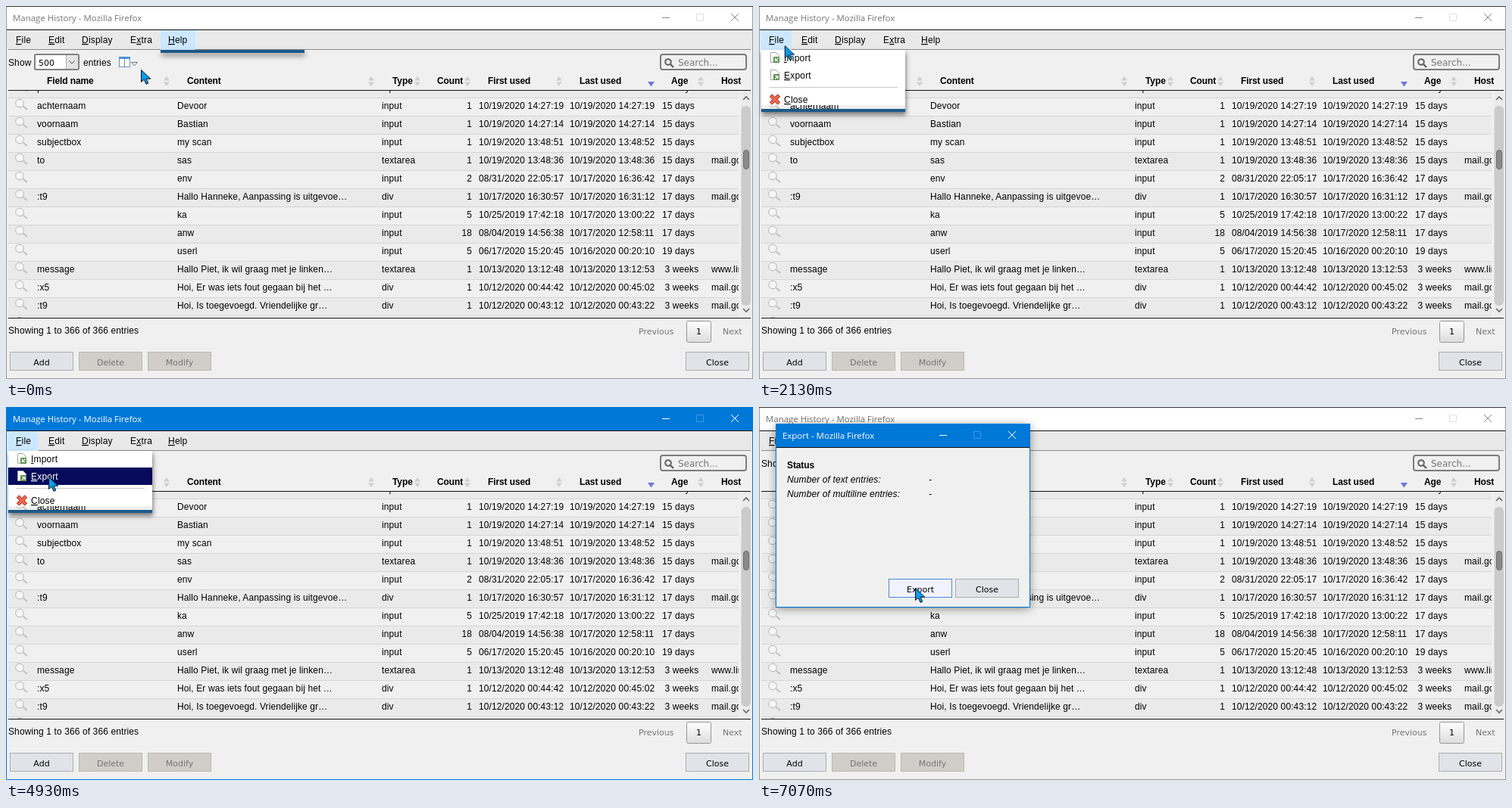
Write an HTML page that moves like this. It is 986x493 px and loops after 8 s.

```html
<!DOCTYPE html>
<html lang="en">
<head>
<meta charset="utf-8">
<title>Manage History</title>
<style>
html, body { margin: 0; width: 986px; height: 493px; overflow: hidden; background: #f0f0f0; }
svg { position: absolute; left: 0; top: 0; }
text { font: 12px "Liberation Sans", Arial, sans-serif; letter-spacing: .11px; fill: #000; white-space: pre; }
.bold { font-weight: bold; letter-spacing: -.1px; }
.ital { font-style: italic; }
.menu { letter-spacing: .2px; }
.title { font: 11.45px "Open Sans", "Noto Sans", sans-serif; letter-spacing: 0; }
.ui { font: 11px "DejaVu Sans", sans-serif; letter-spacing: 0; }
.mid { text-anchor: middle; }
.end { text-anchor: end; }
.dim { fill: #757575; }
.white { fill: #fff; }
.u { text-decoration: underline; }

.drop { position: absolute; top: 58px; width: 190px; height: 0; overflow: hidden;
  border-bottom: 4px solid #1d5a88; box-shadow: 1px 4px 6px rgba(0, 0, 0, .5); }
#file { left: 3px; animation: fileOn 8s step-end infinite, unroll 8s infinite; }
#file svg { left: -3px; top: -58px; }
#help { left: 204px; }
#help, .helpOn { animation: helpOn 8s step-end infinite; }
#dialog { position: absolute; left: 22px; top: 22px; width: 336px; height: 243px;
  box-shadow: 0 2px 11px rgba(0, 0, 0, .4); animation: open 8s infinite; }
#dialog svg { left: -22px; top: -22px; }
#cursor { animation: move 8s infinite; }

.fileOn { animation: fileOn 8s step-end infinite; }
.rowOn { animation: rowOn 8s step-end infinite; }
.importOn { animation: importOn 8s step-end infinite; }
.exportOn { animation: exportOn 8s step-end infinite; }
.active { animation: active 8s step-end infinite; }
.pressOn { animation: pressOn 8s step-end infinite; }

@keyframes helpOn { 0% { visibility: visible } .82%, 100% { visibility: hidden } }
@keyframes rowOn { 0%, 9.15%, 100% { visibility: hidden } 3.3% { visibility: visible } }
@keyframes fileOn { 0%, 63.28%, 100% { visibility: hidden } 15.77% { visibility: visible } }
@keyframes importOn { 0%, 37.4%, 100% { visibility: hidden } 28.27% { visibility: visible } }
@keyframes exportOn { 0%, 63.28%, 100% { visibility: hidden } 37.4% { visibility: visible } }
@keyframes active { 0%, 63.28%, 100% { visibility: hidden } 61.56% { visibility: visible } }
@keyframes pressOn { 0% { visibility: hidden } 85.75%, 100% { visibility: visible } }
@keyframes unroll {
  0%, 14.94% { height: 0; animation-timing-function: steps(4) }
  18.31%, 100% { height: 78px }
}
@keyframes open {
  0%, 62.54% { opacity: 0; transform: scale(.9); animation-timing-function: steps(3) }
  65% { opacity: .8; transform: scale(.98); animation-timing-function: steps(3) }
  67.44%, 100% { opacity: 1; transform: none }
}
@keyframes move {
  0% { transform: translate(178px, 84px); animation-timing-function: steps(4) }
  3.3%, 7.5% { transform: translate(150px, 130px); animation-timing-function: steps(9) }
  14.94% { transform: translate(37px, 57px); animation-timing-function: steps(4) }
  18.31%, 25.75% { transform: translate(33px, 49px); animation-timing-function: steps(8) }
  32.44% { transform: translate(39px, 74px); animation-timing-function: steps(5) }
  36.56% { transform: translate(46px, 79px); animation-timing-function: steps(5) }
  40.81%, 46.66% { transform: translate(56px, 88px); animation-timing-function: steps(4) }
  49.94%, 73.29% { transform: translate(56px, 92px); animation-timing-function: steps(13) }
  84.09% { transform: translate(199px, 222px); animation-timing-function: steps(5) }
  88.31%, 100% { transform: translate(206px, 239px) }
}
</style>
</head>
<body>
<svg id="main" width="986" height="493"></svg>
<div class="drop" id="help"></div>
<div class="drop" id="file"><svg width="986" height="493"></svg></div>
<div id="dialog"><svg width="986" height="493"></svg></div>
<svg id="cursor" width="16" height="22">
  <path d="M.5 .5V16.5L4.3 13L7 19.3L9.8 18.1L7.2 12.2H12.8Z" fill="#0a9bea" stroke="#06131f"/>
</svg>
<script>
const text = (x, y, s, c = '') => `<text x="${x}" y="${y}" class="${c}">${s}</text>`;
const rect = (x, y, w, h, fill, more = '') =>
  `<rect x="${x}" y="${y}" width="${w}" height="${h}" fill="${fill}" ${more}/>`;
const line = (d, color, width = 1) =>
  `<path d="${d}" fill="none" stroke="${color}" stroke-width="${width}"/>`;
const shape = (d, fill) => `<path d="${d}" fill="${fill}"/>`;
const group = (c, ...parts) => `<g class="${c}">${parts.join('')}</g>`;
// "_" marks the access key
const key = s => s.replace(/_(.)/, '<tspan class="u">$1</tspan>');

const controls = (x, y, color, faint) =>
  line(`M${x} ${y + .5}h10`, color) +
  line(`M${x + 45.5} ${y - 4.5}h9v9h-9z`, faint) +
  line(`M${x + 91} ${y - 5}l10 10m0 -10l-10 10`, color);

const button = (x, y, label, off) =>
  rect(x + .5, y + .5, 83, 24, off ? '#d1cec9' : '#e2e2e9', `stroke="${off ? '#bdb8b0' : '#adadb2'}"`) +
  text(x + 42, y + 17.5, label, 'ui mid' + (off ? ' dim' : ''));

const lens = y =>
  line(`M22.5 ${y + 11.5}L28 ${y + 16}`, '#c0c0c0', 2) +
  `<circle cx="18" cy="${y + 7.5}" r="5.3" fill="#f6f6f6" stroke="#b4b4b4"/>`;

const sorter = x =>
  shape(`M${x - 4} 98.5h8l-4 -5.5zM${x - 4} 100.5h8l-4 5.5z`, '#cfcfcf');

const rows = [
  ['p', '', 'input', 1, '10/20/2020 09:14:02', '10/20/2020 09:14:02', '15 days', ''],
  ['achternaam', 'Devoor', 'input', 1, '10/19/2020 14:27:19', '10/19/2020 14:27:19', '15 days', ''],
  ['voornaam', 'Bastian', 'input', 1, '10/19/2020 14:27:14', '10/19/2020 14:27:14', '15 days', ''],
  ['subjectbox', 'my scan', 'input', 1, '10/19/2020 13:48:51', '10/19/2020 13:48:52', '15 days', ''],
  ['to', 'sas', 'textarea', 1, '10/19/2020 13:48:36', '10/19/2020 13:48:36', '15 days', 'mail.go'],
  ['', 'env', 'input', 2, '08/31/2020 22:05:17', '10/17/2020 16:36:42', '17 days', ''],
  [':t9', 'Hallo Hanneke, Aanpassing is uitgevoe…', 'div', 1, '10/17/2020 16:30:57', '10/17/2020 16:31:12', '17 days', 'mail.go'],
  ['', 'ka', 'input', 5, '10/25/2019 17:42:18', '10/17/2020 13:00:22', '17 days', ''],
  ['', 'anw', 'input', 18, '08/04/2019 14:56:38', '10/17/2020 12:58:11', '17 days', ''],
  ['', 'userl', 'input', 5, '06/17/2020 15:20:45', '10/16/2020 00:20:10', '19 days', ''],
  ['message', 'Hallo Piet, ik wil graag met je linken…', 'textarea', 1, '10/13/2020 13:12:48', '10/13/2020 13:12:53', ' 3 weeks', 'www.lin'],
  [':x5', 'Hoi, Er was iets fout gegaan bij het …', 'div', 1, '10/12/2020 00:44:42', '10/12/2020 00:45:02', ' 3 weeks', 'mail.go'],
  [':t9', 'Hoi, Is toegevoegd. Vriendelijke gr…', 'div', 1, '10/12/2020 00:43:12', '10/12/2020 00:43:22', ' 3 weeks', 'mail.go'],
  ['', '', '', '', '', '', '', '']
];
const columns = [41, 226, 496, 615, 624, 744, 866, 931];

const row = (cells, i) => {
  const y = 97 + 24 * i;
  return rect(3, y, 964, 24, i % 2 ? '#f0f0f0' : '#eaeaea') +
    (i === 1 ? group('rowOn', rect(3, y, 964, 24, '#f6f6f6')) : '') +
    line(`M3 ${y + .5}H967`, '#d6d6d6') + lens(y) +
    cells.map((s, c) => text(columns[c], y + 15, s, c === 3 ? 'end' : '')).join('');
};

const heads = [[54, 'Field name'], [239, 'Content'], [510, 'Type'], [569, 'Count'],
  [636, 'First used'], [757, 'Last used'], [878, 'Age'], [944, 'Host']];
const menus = [[13, '_File'], [56, '_Edit'], [100, '_Display'], [164, 'E_xtra'], [214, '_Help']];
const name = 'Manage History - Mozilla Firefox';

document.querySelector('#main').innerHTML = [
  '<defs><clipPath id="body"><rect x="3" y="112" width="964" height="300"/></clipPath>',
  '<linearGradient id="page" x2="0" y2="1"><stop stop-color="#fff"/><stop offset="1" stop-color="#dcdcdc"/></linearGradient></defs>',
  rect(0, 0, 986, 493, '#f0f0f0'),
  // title bar
  rect(0, 0, 986, 31, '#fff'),
  line('M.5 0V493M985.5 0V493M0 492.5H986', '#9a9a9a'),
  line('M0 .5H986', '#3a3a3a'),
  text(9, 20, name, 'title dim'),
  controls(866, 15, '#868686', '#dedede'),
  group('active', rect(0, 0, 986, 31, '#0078d7'), line('M.5 0V492.5H985.5V0', '#0078d7'),
    text(9, 20, name, 'title white'), controls(866, 15, '#fff', '#3d97e0')),
  // menu bar
  rect(1, 32, 984, 25, '#e9e9e9'),
  line('M1 31.5H985', '#111'),
  line('M3 57.5H983', '#8c8c8c'),
  group('helpOn', rect(204, 32, 46, 26, '#cce8ff')),
  group('fileOn', rect(3, 32, 40, 26, '#cce8ff')),
  menus.map(([x, s]) => text(x, 49, key(s), 'menu')).join(''),
  // toolbar
  text(3, 79, 'Show'), text(102, 79, 'entries'),
  rect(38, 64, 58, 20, '#fff', 'rx="2" stroke="#828282" stroke-width="2"'),
  rect(79, 65, 16, 18, '#e4e4e4'), line('M79.5 65v18', '#aaa'),
  line('M83.5 72.5l3.5 3.5l3.5 -3.5', '#444'),
  text(43, 79, '500', 'ui'),
  rect(149.5, 67.5, 14, 13, '#fff', 'stroke="#6b8fb8"'),
  rect(150, 67, 13, 3, '#4a90d9'), line('M156.5 70v10', '#6b8fb8'),
  line('M165.5 74.5h8l-4 4.5z', '#777'),
  rect(864, 64, 113, 20, '#f0f0f0', 'rx="3" stroke="#7c7c7c" stroke-width="2"'),
  line('M877 77l4 4', '#606060', 2.4),
  '<circle cx="874" cy="74" r="3.8" fill="none" stroke="#606060" stroke-width="2"/>',
  `<g style="font-size:12px">${text(887, 79, 'Search...', 'ui dim').replace('<text', '<text style="font-size:12px"')}</g>`,
  // table
  heads.map(([x, s]) => text(x, 103, s, 'bold')).join(''),
  [212, 482, 543, 609, 730, 917].map(sorter).join(''),
  shape('M847 100h9l-4.5 6.5z', '#6f74dc'),
  `<g clip-path="url(#body)">${rows.map(row).join('')}</g>`,
  line('M3 111.5H983M3 412.5H983', '#111'),
  // scrollbar
  rect(970, 112, 14, 300, '#ececec'),
  rect(970.5, 132, 12.5, 264, '#cbcbcb', 'rx="6"'),
  rect(973.5, 190.5, 7, 25, '#8a8a8a', 'rx="3.5" stroke="#6c6c6c"'),
  line('M973 124l4 -4l4 4M973 400l4 4l4 -4', '#666', 1.6),
  // footer
  text(3, 433, 'Showing 1 to 366 of 366 entries'),
  text(835, 434, 'Previous', 'ui dim'), text(946, 434, 'Next', 'ui dim'),
  rect(898.5, 416.5, 32, 28, 'url(#page)', 'rx="2" stroke="#979797"'),
  text(914.5, 434, '1', 'ui mid'),
  button(5, 457, 'Add'), button(96, 457, 'Delete', true),
  button(187, 457, 'Modify', true), button(897, 457, 'Close')
].join('');

const sheet = (y, arrow) =>
  `<path d="M15.5 ${y - 6.5}h7l4 4v9h-11z" fill="#fff" stroke="#a3a9a3"/>` +
  rect(19, y - 1, 8, 8, '#5c8f4e', 'rx="1"') + line(arrow, '#fff', 1.2);
const item = (y, label, icon, hot) =>
  text(33, y + 5, key(label), 'menu') + icon +
  (hot ? group(hot, rect(3, y - 11, 190, 23, '#080a5c'), text(33, y + 5, key(label), 'menu white'), icon) : '');

document.querySelector('#file svg').innerHTML = [
  rect(3, 57, 190, 74, '#fff'),
  item(68, '_Import', sheet(68, 'M25.5 68.5l-4 4m0 -4v4h4'), 'importOn'),
  item(91, '_Export', sheet(91, 'M21 96.5l4 -4m-4 0h4v4'), 'exportOn'),
  line('M13 107.5H183', '#c8c8c8'),
  item(123, '_Close', line('M15.5 118l11 11m0 -11l-11 11', '#b93a28', 5) +
    line('M16 118.5l10 10m0 -10l-10 10', '#ee6a55', 3))
].join('');

document.querySelector('#dialog svg').innerHTML = [
  rect(22.5, 22.5, 335, 242, '#f0f0f0', 'stroke="#0078d7"'),
  rect(22, 22, 336, 31, '#0078d7'),
  line('M23 53.5H357', '#111'),
  text(31, 42, 'Export - Mozilla Firefox', 'title white'),
  controls(238, 37, '#fff', '#3d97e0'),
  text(37, 81, 'Status', 'bold'),
  text(37, 100, 'Number of text entries:', 'ital'), text(224, 100, '-', 'ital'),
  text(37, 119, 'Number of multiline entries:', 'ital'), text(224, 119, '-', 'ital'),
  button(171, 227, 'Export'), button(259, 227, 'Close'),
  group('pressOn', rect(171.5, 227.5, 83, 24, '#f1f2fd', 'stroke="#4f86d6"'),
    text(213, 244.5, 'Export', 'ui mid'))
].join('');
</script>
</body>
</html>
```
